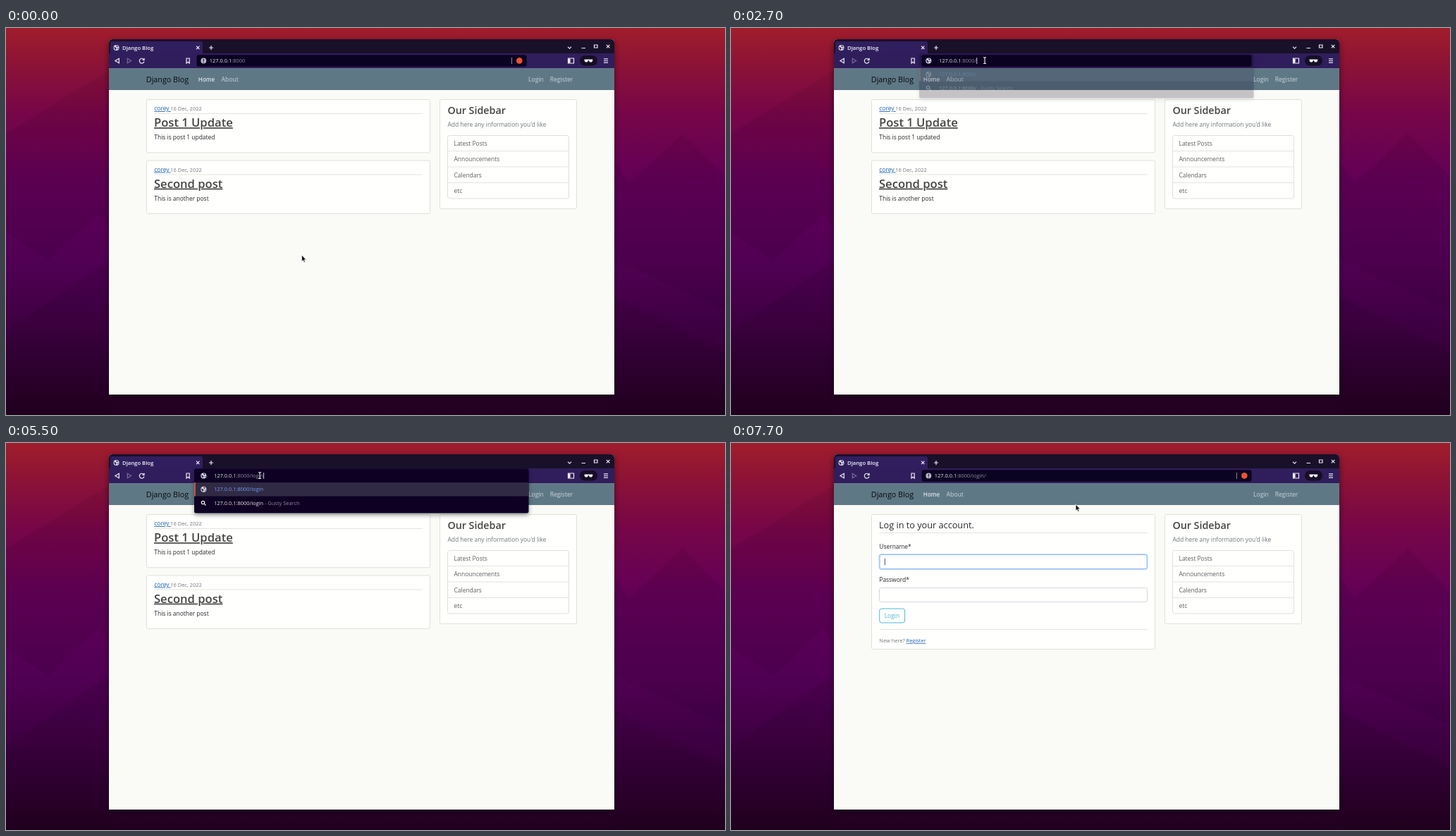
These frames come from a looping animation (1020 by 549 pixels, 8 s). An HTML page:

```html
<!DOCTYPE html>
<html lang="en">
<head>
<meta charset="utf-8">
<title>Django Blog</title>
<style>
  html, body { margin: 0; width: 100%; height: 100%; overflow: hidden; background: #22021f; }
  svg { display: block; width: 1020px; height: 549px; }
  text { font: 8.45px "Open Sans", "Noto Sans", sans-serif; white-space: pre; }
  .small { font-size: 7.45px; }
  .nav { font-size: 8.65px; fill: #cbd5db; }
  .title { font-size: 16.6px; font-weight: 600; fill: #444; }
  .ink { fill: #26292c; }
  .muted { fill: #70767c; }
  .link { fill: #1c62b5; }
  .card { fill: #fffffd; stroke: #dfdfdc; }
  .rule { stroke: #e3e3e0; fill: none; }
  .ico { fill: none; stroke: #eeebf6; stroke-width: 1.2; }
  .url { font-size: 7.45px; fill: #e9e7f0; }
  .dim { fill: #8f8b9e; }
</style>
</head>
<body>
<svg viewBox="0 0 1020 549">
  <defs>
    <linearGradient id="sky" x2="0" y2="1">
      <stop offset="0" stop-color="#a01d2b"/>
      <stop offset=".1" stop-color="#8b1237"/>
      <stop offset=".22" stop-color="#770648"/>
      <stop offset=".4" stop-color="#610058"/>
      <stop offset=".6" stop-color="#510054"/>
      <stop offset=".8" stop-color="#3a003e"/>
      <stop offset="1" stop-color="#21001f"/>
    </linearGradient>
    <filter id="shade" x="-10%" y="-10%" width="120%" height="125%">
      <feDropShadow dx="0" dy="3" stdDeviation="5" flood-opacity=".5"/>
    </filter>
    <filter id="soft" x="-5%" y="-20%" width="110%" height="160%">
      <feDropShadow dx="0" dy="3" stdDeviation="3" flood-opacity=".35"/>
    </filter>
    <g id="globe">
      <circle r="4" fill="#dcd9e6"/>
      <path d="M-3.4 -1.2L-1 -.6L.2 1L-.8 3.2L-2.4 1.6ZM-.4 -3.4L2.4 -2.6L1.8 -.8L.4 -1.2ZM1.4 .6L3.2 .4L2 2.6Z" fill="#332758"/>
    </g>
  </defs>

  <rect width="1020" height="549" fill="url(#sky)"/>
  <g fill="#000" opacity=".06">
    <path d="M0 150L146 60V250L60 330L0 290Z"/>
    <path d="M0 430L146 330V549H0Z"/>
    <path d="M863 240L960 150L1020 210V400L863 330Z"/>
    <path d="M863 380L1020 460V549H863Z"/>
    <path d="M100 215L146 150V285Z"/>
    <path d="M863 190L905 250L863 310Z"/>
  </g>

  <!-- browser window -->
  <path d="M146 520V21Q146 16 151 16H858Q863 16 863 21V520Z" fill="#fafaf6" filter="url(#shade)"/>
  <path d="M146 37V21Q146 16 151 16H858Q863 16 863 21V37Z" fill="#191029"/>
  <path d="M148 37V22Q148 19 151 19H276Q279 19 279 22V37Z" fill="#301f5e"/>
  <rect x="146" y="36" width="717" height="21.5" fill="#2f1e5b"/>
  <use id="favicon" href="#globe" x="156.5" y="28"/>
  <path id="spinner" class="ico" d="M156.5 24.5A3.5 3.5 0 1 1 153 28"/>
  <text x="165" y="31" fill="#f3f1f8" style="font-size:7.7px;font-weight:600">Django Blog</text>
  <g class="ico">
    <path d="M270 25.7l4.4 4.4m0-4.4l-4.4 4.4M288 28h6m-3-3v6M797 26.7l2.5 2.5l2.5-2.5M816.5 28.5h5.5M834.5 24h4.5v4h-4.5zM851.8 23.8l4.6 4.6m0-4.6l-4.6 4.6"/>
    <path d="M160.3 43.2v6.6l-5.4-3.3z"/>
    <path d="M172.3 43.2v6.6l5.4-3.3z" stroke="#776c98"/>
    <path d="M195.5 44.7A3.4 3.4 0 1 0 196 47.5M196 42.8v2.5h-2.6"/>
    <path d="M256 43h4.2v7l-2.1-1.8l-2.1 1.8z"/>
    <path d="M797.5 43h8v7h-8z"/>
    <path d="M848 43.8h6m-6 2.7h6m-6 2.7h6"/>
  </g>
  <path d="M798 43.5h2.6v6h-2.6z" fill="#eeebf6"/>
  <rect x="814" y="39" width="25" height="14.5" rx="7.2" fill="#160d26"/>
  <path d="M820.5 44.6h11.8v1.2q-.4 2.8-2.8 2.8t-2.6-2.6h-1q-.2 2.6-2.6 2.6t-2.8-2.8z" fill="#f4f2f8"/>

  <!-- page header -->
  <rect x="146" y="57.3" width="717" height="30.7" fill="#5f7886"/>
  <text x="198.8" y="76.6" fill="#080a0c" style="font-size:10.75px">Django Blog</text>
  <text x="272.8" y="76" class="nav" style="font-size:8.1px;font-weight:600;fill:#dce3e7">Home</text>
  <text x="305.5" y="76" class="nav">About</text>
  <text x="741" y="76" class="nav">Login</text>
  <text x="771.7" y="76" class="nav">Register</text>

  <!-- sidebar -->
  <rect class="card" x="615.5" y="101.5" width="194" height="155" rx="2"/>
  <text x="626.4" y="122" class="title" style="font-size:14.3px">Our Sidebar</text>
  <text x="626.5" y="140" class="muted">Add here any information you'd like</text>
  <rect class="card" x="626.5" y="152.5" width="172" height="89.5" rx="3"/>
  <path class="rule" d="M627 174.5h171M627 197h171M627 219.5h171"/>
  <g id="list" fill="#5c5f61"></g>

  <!-- page bodies -->
  <g id="posts"></g>
  <g id="login">
    <rect class="card" x="199.5" y="101.5" width="402" height="191" rx="2"/>
    <text x="210" y="121.3" class="ink" style="font-size:12.7px">Log in to your account.</text>
    <path class="rule" d="M210.5 127.5h380M210.5 264.5h380"/>
    <text x="210.3" y="150.2" class="ink">Username*</text>
    <rect id="glow" x="209.5" y="157" width="382" height="23" rx="4" fill="#c3dafc"/>
    <rect x="211" y="158.5" width="379" height="20" rx="2.5" fill="#fffffd" stroke="#8fb8f5"/>
    <path d="M218.3 163.8v9.4" stroke="#333" stroke-width=".9"/>
    <text x="210.3" y="197.3" class="ink">Password*</text>
    <rect x="210.5" y="205.5" width="380" height="20" rx="3" fill="#fffffd" stroke="#d3d7da"/>
    <rect x="210.7" y="235" width="35.8" height="20" rx="3" fill="#fffffd" stroke="#4dbad6"/>
    <text x="217.7" y="248.2" fill="#43b4d3">Login</text>
    <text x="210.3" y="283.3" class="small muted">New here? <tspan class="link" text-decoration="underline">Register</tspan></text>
  </g>

  <!-- address bar -->
  <rect id="bar" x="270.5" y="38.3" width="468" height="16.4" rx="3" fill="#0b0322"/>
  <g id="drop">
    <g filter="url(#soft)">
      <path d="M267 39Q267 36.5 269.5 36.5H739Q741.5 36.5 741.5 39V97Q741.5 99.5 739 99.5H269.5Q267 99.5 267 97Z" fill="#0b0322"/>
    </g>
    <rect x="267" y="56" width="474.5" height="19.5" fill="#302a45"/>
    <rect x="267" y="56" width="1.8" height="19.5" fill="#d9503f"/>
    <rect id="hover" x="267" y="75.5" width="474.5" height="20" fill="#1d1733"/>
    <use href="#globe" x="280.3" y="65.8"/>
    <g class="ico" stroke-width="1"><circle cx="279.5" cy="84.5" r="2.2"/><path d="M281.2 86.2l2.3 2.3"/></g>
    <text x="295" y="68.4" class="url" style="fill:#6f9cf8;font-weight:500">127.0.0.1:8000/<tspan class="typed"></tspan></text>
    <text x="295" y="88.2" class="url">127.0.0.1:8000/<tspan class="typed"></tspan><tspan class="dim"> - Gusty Search</tspan></text>
  </g>
  <g id="idle">
    <circle cx="280.3" cy="46.4" r="3.9" fill="#b9b5c6"/>
    <path d="M280.3 44v3.1m0 .8v1.1" stroke="#0b0322" stroke-width="1.1"/>
    <path d="M717.5 42v9" stroke="#8b849e"/>
    <circle cx="728.3" cy="46.4" r="4.3" fill="#ee5230"/>
  </g>
  <use id="site" href="#globe" x="280.3" y="46.5"/>
  <g id="share" class="ico" stroke-width="1">
    <path d="M703.5 45v-2.5h2.3m2.6 0h2.3V45m0 3v2.5h-2.3m-2.6 0h-2.3V48M705 45h4.2v3H705z"/>
  </g>
  <rect id="mark" x="288.7" y="41.3" width="51.3" height="10.2" fill="#3464b8"/>
  <text id="addr" y="49.2" class="url">127.0.0.1<tspan id="tail" class="dim"></tspan></text>
  <path id="caret" d="M0 42v9" stroke="#d8d5e2" stroke-width=".9"/>

  <path id="arrow" d="M0 0V9.2L2 7.4L3.4 10.4L4.9 9.7L3.6 6.8H6.4Z" fill="#15131a" stroke="#fff" stroke-width=".7"/>
  <g id="beam" fill="none">
    <path d="M-2 -4.5Q0 -4.5 0 -3.5Q0 -4.5 2 -4.5M0 -3.5V3.5M-2 4.5Q0 4.5 0 3.5Q0 4.5 2 4.5" stroke="#100a20" stroke-width="2.4"/>
    <path d="M-2 -4.5Q0 -4.5 0 -3.5Q0 -4.5 2 -4.5M0 -3.5V3.5M-2 4.5Q0 4.5 0 3.5Q0 4.5 2 4.5" stroke="#f2f0f6" stroke-width="1.1"/>
  </g>
</svg>
<script>
const LOOP = 8000;
const $ = id => document.getElementById(id);
const show = (id, level) => $(id).setAttribute('opacity', Number(level));

$('list').innerHTML = ['Latest Posts', 'Announcements', 'Calendars', 'etc']
  .map((label, i) => `<text x="635.5" y="${166.6 + i * 22.5}">${label}</text>`).join('');

const post = (y, title, body) => `
  <rect class="card" x="199.5" y="${y}" width="402" height="75.3" rx="2"/>
  <text x="210.3" y="${y + 15.6}" class="link" text-decoration="underline">corey </text>
  <text x="233.3" y="${y + 15.6}" class="small muted">16 Dec, 2022</text>
  <path class="rule" d="M210.5 ${y + 20}h380"/>
  <text x="210" y="${y + 38.6}" class="title" text-decoration="underline">${title}</text>
  <text x="210.3" y="${y + 56.9}" class="ink">${body}</text>`;
$('posts').innerHTML =
  post(101.5, 'Post 1 Update', 'This is post 1 updated') +
  post(188, 'Second post', 'This is another post');

// Each step changes part of the state from its time on.
const steps = [
  [0, { x: 419.5, y: 322, beam: 0, focus: 0, mark: 0, edit: 0, drop: 0, typed: '',
        tail: ':8000', caret: 0, hover: 0, login: 0, glow: 0, load: 0 }],
  [500, { x: 384, y: 222 }],
  [700, { x: 351.5, y: 117 }],
  [900, { x: 343, y: 84 }],
  [1000, { x: 340, y: 50, beam: 1 }],
  [1100, { x: 345, y: 47 }],
  [1200, { x: 352, y: 46 }],
  [1300, { x: 358, y: 46 }],
  [1400, { x: 360, y: 46 }],
  [1600, { focus: 1, mark: 1 }],
  [2200, { mark: 0, caret: 1 }],
  [2700, { focus: 0, edit: 1, drop: .22, tail: ':8000/' }],
  [2800, { drop: 1 }],
  [3100, { typed: 'l' }],
  [3300, { typed: 'lo' }],
  [3800, { caret: 0 }],
  [4300, { typed: 'l', caret: 1 }],
  [4600, { typed: 'lo' }],
  [4900, { typed: 'log' }],
  [5300, { typed: 'logi' }],
  [5500, { typed: 'login' }],
  [6000, { caret: 0 }],
  [6500, { caret: 1 }],
  [7000, { caret: 0, beam: 0, x: 412.3, y: 70, hover: 1 }],
  [7100, { x: 489, y: 87 }],
  [7400, { drop: 0, edit: 0, load: 1 }],
  [7600, { login: 1, glow: .5, load: 0, tail: ':8000/login/', typed: '' }],
  [7700, { glow: 1 }],
];

function draw(time) {
  const s = Object.assign({}, ...steps.filter(([at]) => at <= time).map(([, change]) => change));
  show('posts', !s.login);
  show('login', s.login);
  show('glow', s.glow);
  show('favicon', !s.load);
  show('spinner', s.load);
  $('spinner').setAttribute('transform', `rotate(${time * .36} 156.5 28)`);

  show('drop', s.drop);
  show('hover', s.hover);
  show('idle', !s.edit);
  show('site', s.edit);
  show('share', s.focus);
  show('mark', s.mark);
  $('bar').setAttribute('stroke', s.focus ? '#a99bf0' : 'none');
  $('bar').setAttribute('stroke-width', 1.5);

  const left = s.edit ? 295 : 288.8;
  $('addr').setAttribute('x', left);
  $('tail').textContent = s.tail + s.typed;
  $('tail').style.fill = s.mark ? '#e9e7f0' : '';
  document.querySelectorAll('.typed').forEach(el => { el.textContent = s.typed; });
  show('caret', s.caret);
  $('caret').setAttribute('transform', `translate(${left + $('addr').getComputedTextLength() + .5} 0)`);

  show('arrow', !s.beam);
  show('beam', s.beam);
  $(s.beam ? 'beam' : 'arrow').setAttribute('transform', `translate(${s.x} ${s.y})`);
}

function tick() {
  draw(performance.now() % LOOP);
  requestAnimationFrame(tick);
}
tick();
</script>
</body>
</html>
```
